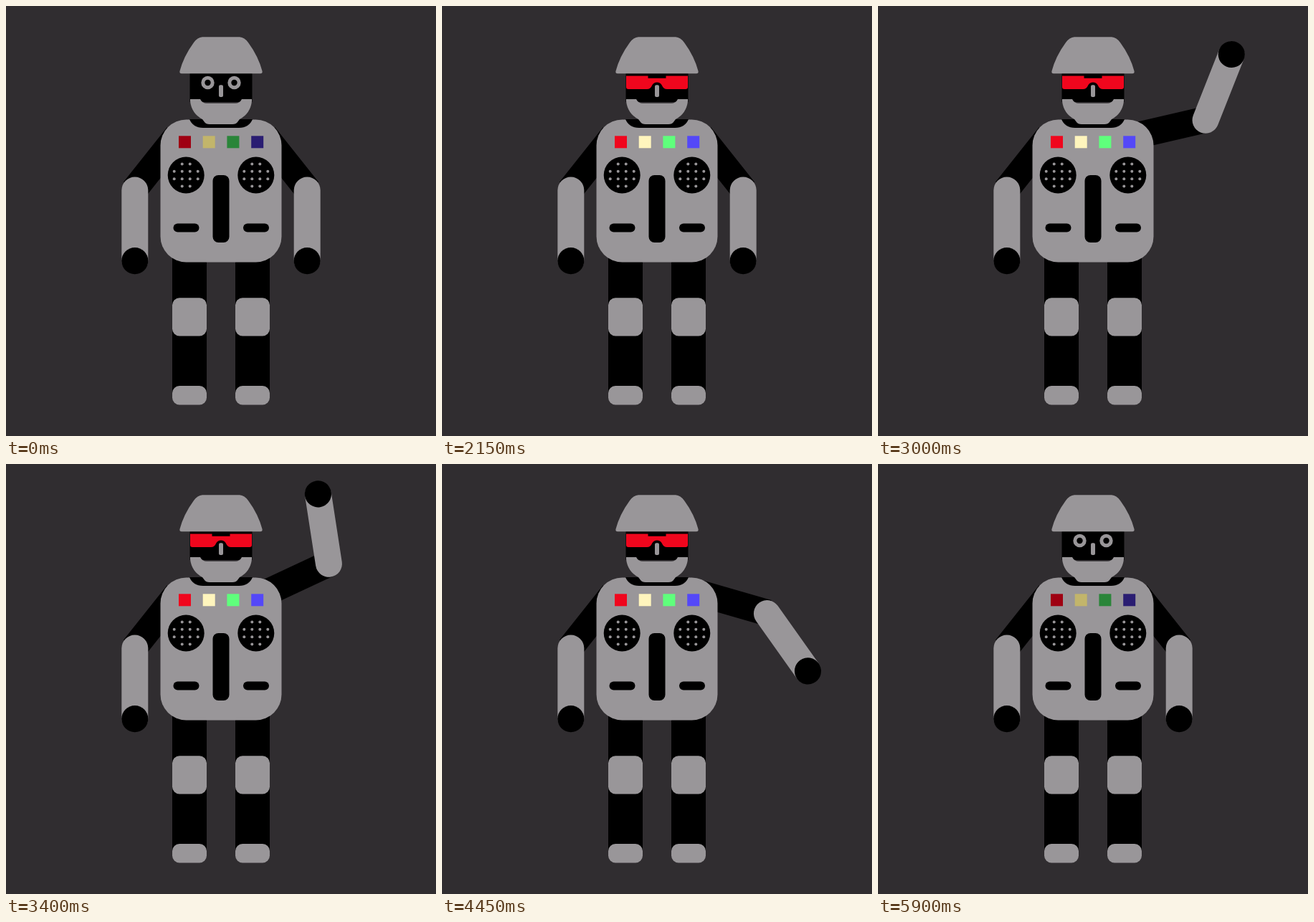
An HTML page with a canvas for the animation above (6050 ms loop, 600 by 600 pixels).

```html
<!DOCTYPE html>
<html lang="en">
<head>
<meta charset="utf-8">
<title>Robot</title>
<style>
html, body { margin: 0; width: 100%; height: 100%; overflow: hidden; background: #302d30; }
canvas { display: block; width: 100vmin; height: 100vmin; }
</style>
</head>
<body>
<canvas id="stage" width="600" height="600"></canvas>
<script>
const ctx = document.getElementById('stage').getContext('2d');
const LOOP = 6050;
const BG = '#302d30', GRAY = '#999699', BLACK = '#000', RED = '#f0061d';
const SHOULDER = [360.9, 180.7], ELBOW = [421.5, 257];
const LIGHTS = [
  { x: 241, off: '#9f0012', on: RED, at: 400 },
  { x: 274.7, off: '#c2b56b', on: '#fff5bd', at: 800 },
  { x: 308.4, off: '#2a8539', on: '#5fff7c', at: 1200 },
  { x: 342.2, off: '#2a1d72', on: '#5448f8', at: 1600 }
];
const LIGHTS_OFF = 5050;

const clamp = v => Math.max(0, Math.min(1, v));
const part = (t, from, to) => clamp((t - from) / (to - from));

// Piecewise linear value through [time, value] keys
function track(t, keys) {
  let v = keys[0][1];
  for (let i = 1; i < keys.length; i++) {
    const [t0, v0] = keys[i - 1], [t1, v1] = keys[i];
    if (t >= t0) v = v0 + (v1 - v0) * part(t, t0, t1);
  }
  return v;
}

function box(x, y, w, h, r, color) {
  ctx.fillStyle = color;
  ctx.beginPath();
  ctx.roundRect(x, y, w, h, r);
  ctx.fill();
}

function disc(x, y, r, color) {
  ctx.fillStyle = color;
  ctx.beginPath();
  ctx.arc(x, y, r, 0, Math.PI * 2);
  ctx.fill();
}

function shape(d, color) {
  ctx.fillStyle = color;
  ctx.fill(new Path2D(d));
}

function turn([x, y], deg) {
  ctx.translate(x, y);
  ctx.rotate(deg * Math.PI / 180);
  ctx.translate(-x, -y);
}

function arm(upper, fore) {
  ctx.save();
  turn(SHOULDER, upper);
  ctx.strokeStyle = BLACK;
  ctx.lineWidth = 37;
  ctx.beginPath();
  ctx.moveTo(...SHOULDER);
  ctx.lineTo(...ELBOW);
  ctx.stroke();
  turn(ELBOW, fore);
  box(401.7, 238.5, 37, 135, 18.5, GRAY);
  disc(420.2, 355.6, 18.6, BLACK);
  ctx.restore();
}

function mirrored(draw) {
  ctx.save();
  ctx.translate(600, 0);
  ctx.scale(-1, 1);
  draw();
  ctx.restore();
}

function leg() {
  box(320, 340, 48, 204, 0, BLACK);
  box(320, 407.3, 48, 53.2, 10, GRAY);
  box(320, 530, 48, 26.4, 10, GRAY);
}

function speaker() {
  disc(348.8, 236, 25.5, BLACK);
  for (let i = 0; i < 4; i++) {
    for (let j = 0; j < 4; j++) {
      const dx = (i - 1.5) * 11, dy = (j - 1.5) * 10.4;
      if (Math.hypot(dx, dy) < 20) disc(348.8 + dx, 236 + dy, 2, GRAY);
    }
  }
}

function torso(t) {
  box(215.5, 158.5, 169, 199, 36, GRAY);
  shape('M256 158H344Q339 170 325 170H275Q261 170 256 158Z', BLACK);
  for (const l of LIGHTS) {
    const lit = t >= l.at && t < LIGHTS_OFF;
    box(l.x, 181.3, 17, 17, 0, lit ? l.on : l.off);
  }
  speaker();
  mirrored(speaker);
  box(288.5, 236, 23, 94, 8, BLACK);
  box(233.5, 303.5, 36, 12, 6, BLACK);
  box(331, 303.5, 36, 12, 6, BLACK);
}

function visor(alpha) {
  if (alpha <= 0) return;
  ctx.save();
  ctx.globalAlpha = alpha;
  box(257, 94, 86, 24, 0, BLACK);
  shape('M257 97.5H287.5V100.7H312.5V97.5H343V113Q343 116 340 116H314' +
    'Q309 116 307 111Q305 106.5 300 106.5Q295 106.5 293 111Q291 116 286 116H260Q257 116 257 113Z', RED);
  ctx.restore();
}

function head(t) {
  box(256.5, 92, 87, 42, 0, BLACK);
  shape('M257 130H271Q274 135.8 280 135.8H320Q326 135.8 329 130H343V133Q341 150 326 158' +
    'L323 162Q321 165 316 165H284Q279 165 277 162L274 158Q259 150 257 133Z', GRAY);
  for (const x of [281.5, 318.5]) {
    disc(x, 107, 9.2, GRAY);
    disc(x, 107, 4.2, BLACK);
  }
  visor(t < 4000 ? part(t, 1700, 2130) : 1 - part(t, 5350, 5900));
  box(297, 110.3, 6, 16.7, 2, GRAY);
  shape('M274 43.3H326Q333 44 338 51Q352 70 357.6 91Q358 94.2 355 94.2H245' +
    'Q242 94.2 242.4 91Q248 70 262 51Q267 44 274 43.3Z', GRAY);
}

function draw(t) {
  const lift = t < 4100
    ? -76.6 * part(t, 2200, 3150)
    : -76.6 * Math.pow(1 - part(t, 4100, 4950), 1.45);
  const bend = track(t, [[2200, 0], [2800, -130], [3150, -67], [3500, -130], [4100, 0]]);
  ctx.fillStyle = BG;
  ctx.fillRect(0, 0, 600, 600);
  leg();
  mirrored(leg);
  mirrored(() => arm(0, 0));
  arm(lift, bend);
  torso(t);
  head(t);
}

const start = performance.now();
function tick() {
  draw((performance.now() - start) % LOOP);
  requestAnimationFrame(tick);
}
tick();
</script>
</body>
</html>
```
